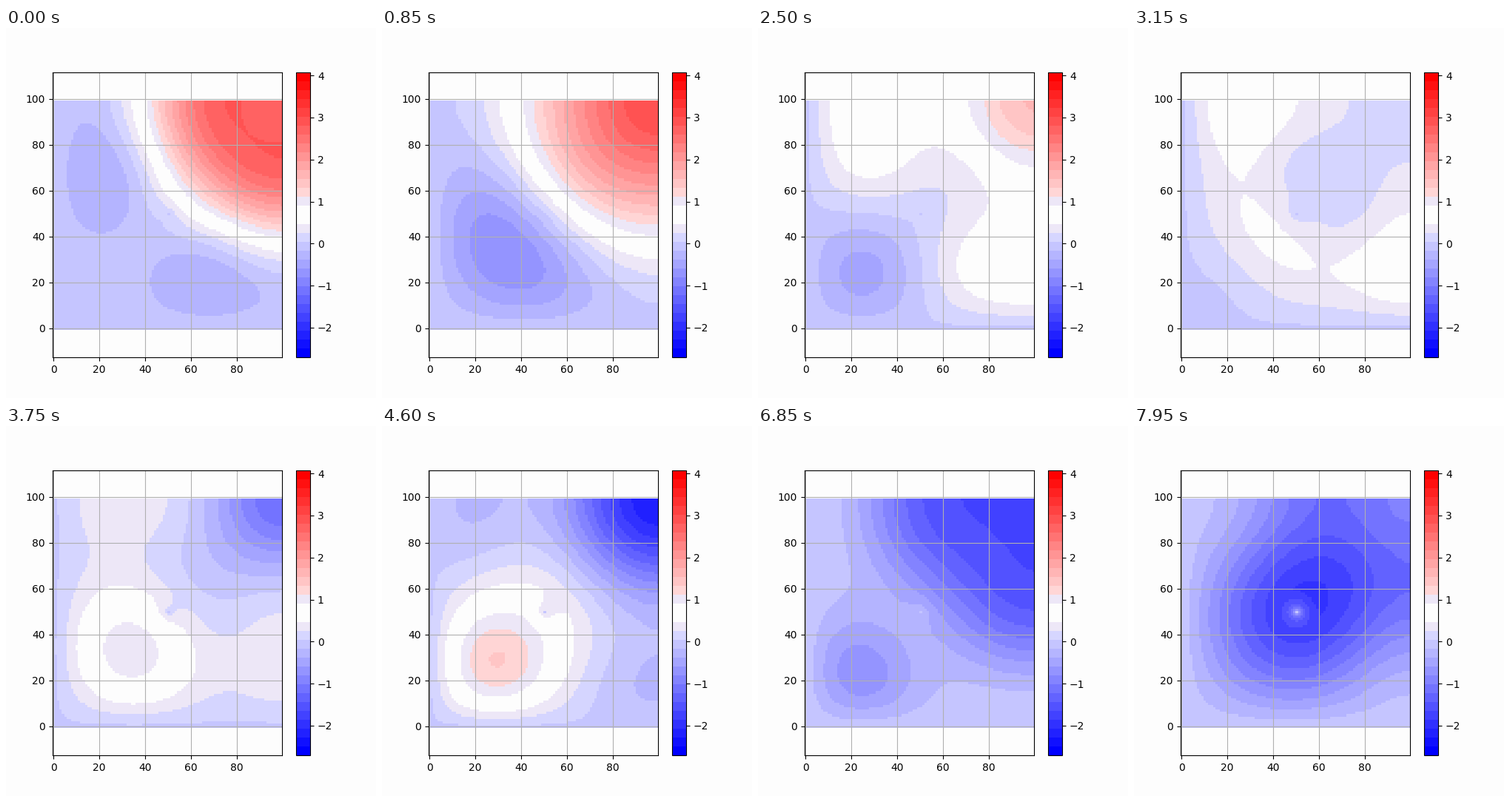
Recreate the animation shown at these times as a matplotlib script. Size 500 by 500 pixels, loop 8 s.

```python
import numpy as np
import matplotlib.pyplot as plt
from matplotlib.animation import FuncAnimation
from matplotlib.colors import ListedColormap

N = 100             # grid cells per side
FRAMES = 160
SPEED = 0.72        # cells per frame
VMIN, VMAX = -2.706, 4.074
PAPER = 253 / 255

# Standing waves: order in x, order in y, amplitude, frame of zero crossing
MODES = [
    (0, 0, -2.04, 79),
    (0, 1, 0.87, 54),
    (1, 1, 0.43, 68),
    (0, 2, 0.21, 29),
    (1, 2, 0.25, 63),
    (2, 2, 0.06, 0),
    (1, 3, 0.07, 13),
]

cells = np.arange(N)


def wavenumber(order):
    """Fixed at the low edge, free at the high edge."""
    return (2 * order + 1) * np.pi / (2 * N - 1)


def standing(m, n):
    """Mode shape, symmetric about the diagonal."""
    sm, sn = (np.sin(wavenumber(k) * cells) for k in (m, n))
    shape = np.outer(sm, sn)
    return shape if m == n else shape + shape.T


def pinned_dimple(reach=0.623):
    """Logarithmic dip that holds the centre cell at zero."""
    d = cells - N // 2
    r = np.hypot(d[:, None], d[None, :])
    pull = np.log(np.maximum(r, 1)) / (2 * np.pi) + 0.257
    return np.where(r == 0, 1, np.clip(1 - pull / reach, 0, 1))


waves = [(standing(m, n) * amp,
          SPEED * np.hypot(wavenumber(m), wavenumber(n)), zero)
         for m, n, amp, zero in MODES]
dimple = pinned_dimple()


def surface(t):
    u = sum(shape * np.sin(omega * (t - zero)) for shape, omega, zero in waves)
    return u - u[N // 2, N // 2] * dimple


colors = plt.get_cmap("bwr", 32)(np.arange(32))
colors[15:17, :3] = PAPER
colors[[14, 17], :3] = np.array([237, 231, 247]) / 255

fig, ax = plt.subplots(figsize=(5, 5), dpi=100, facecolor=(PAPER,) * 3)
ax.set_facecolor((PAPER,) * 3)
image = ax.imshow(surface(0), origin="lower", cmap=ListedColormap(colors),
                  vmin=VMIN, vmax=VMAX, interpolation="nearest", aspect="auto")
fig.colorbar(image, ax=ax)

# Equal scale on both axes: 3.1 px per cell in a box 385 px high
half = 385 / 2 / 3.1
ax.set_xlim(-0.5, N - 0.5)
ax.set_ylim(N / 2 - 0.5 - half, N / 2 - 0.5 + half)
ax.set_xticks(range(0, 100, 20))
ax.set_yticks(range(0, 101, 20))
ax.grid(True)


def update(i):
    image.set_data(surface(i))
    return [image]


anim = FuncAnimation(fig, update, frames=FRAMES, interval=50, repeat=True,
                     repeat_delay=0, blit=False)
plt.show()
```
